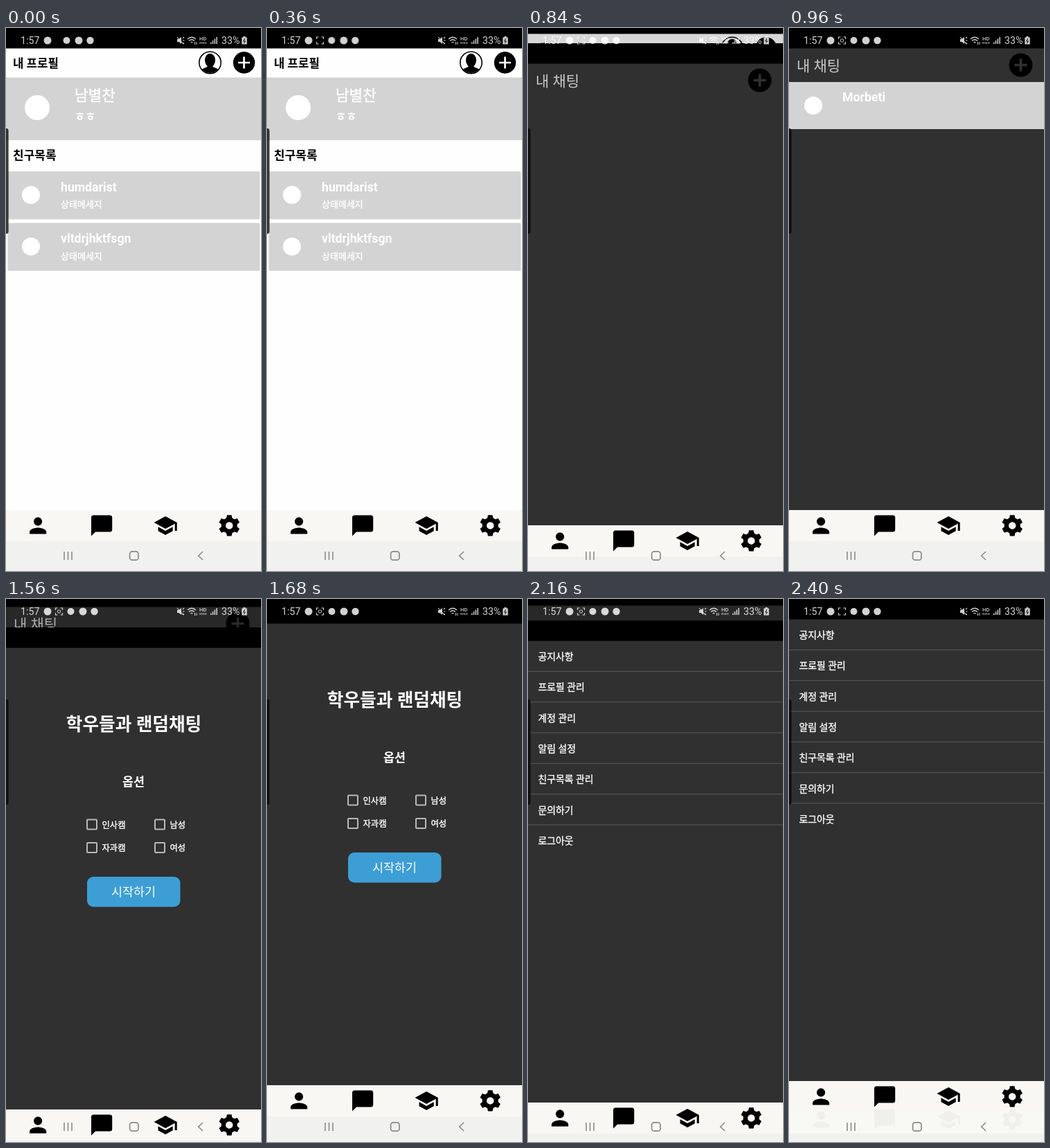
Recreate the animation shown at these times as an HTML page. Size 368x784 px, loop 2.64 s.

```html
<!DOCTYPE html>
<html lang="ko">
<head>
<meta charset="utf-8">
<title>Chat app</title>
<style>
  html, body { margin: 0; width: 100%; height: 100%; overflow: hidden; background: #000; }
  svg { display: block; width: 368px; height: 784px; }
  text { font-family: Roboto, "Noto Sans CJK KR", "Noto Sans CJK", sans-serif; white-space: pre; }
</style>
</head>
<body>
<svg id="stage" viewBox="0 0 368 784" xmlns="http://www.w3.org/2000/svg"></svg>
<script>
const LOOP = 2640;
const DARK = '#303030', CARD = '#d3d3d3';

const rect = (x, y, w, h, fill, more = '') =>
  `<rect x="${x}" y="${y}" width="${w}" height="${h}" fill="${fill}" ${more}/>`;
const disc = (x, y, r, fill, more = '') =>
  `<circle cx="${x}" cy="${y}" r="${r}" fill="${fill}" ${more}/>`;
const label = (x, y, size, str, fill = '#fff', weight = 400, more = '') =>
  `<text x="${x}" y="${y}" font-size="${size}" fill="${fill}" font-weight="${weight}" ${more}>${str}</text>`;
// Medium weight: regular glyphs with a hairline outline
const medium = (x, y, size, str) =>
  label(x, y, size, str, '#fff', 400, 'stroke="#fff" stroke-width=".35"');
const line = (d, color, width) =>
  `<path d="${d}" fill="none" stroke="${color}" stroke-width="${width}"/>`;
const group = (id, body, more = '') => `<g id="${id}" ${more}>${body}</g>`;

const plus = (x, y, r, arm, color, width) =>
  disc(x, y, r, '#000') + line(`M${x - arm} ${y}h${2 * arm}M${x} ${y - arm}v${2 * arm}`, color, width);

// Bottom tabs
const glyph = (x, d) => `<path transform="translate(${x - 18} 700.4) scale(1.51)" d="${d}"/>`;

function gear(x, y) {
  let teeth = '';
  for (let a = 0; a < 360; a += 60)
    teeth += `<path d="M-3.3 -15.1h6.6l1 5.1h-8.6z" transform="rotate(${a})"/>`;
  return `<g transform="translate(${x} ${y})">${teeth}` +
    disc(0, 0, 8.4, 'none', 'stroke="#000" stroke-width="6.3"') + '</g>';
}

const tabIcons =
  glyph(46, 'M12 12c2.21 0 4-1.79 4-4s-1.79-4-4-4-4 1.79-4 4 1.79 4 4 4zm0 2c-2.67 0-8 1.34-8 4v2h16v-2c0-2.66-5.33-4-8-4z') +
  glyph(138, 'M20 2H4c-1.1 0-2 .9-2 2v18l4-4h14c1.1 0 2-.9 2-2V4c0-1.1-.9-2-2-2z') +
  glyph(230, 'M5 13.18v4L12 21l7-3.82v-4L12 17zM12 3L1 9l11 6 9-4.91V17h2V9z') +
  gear(322.2, 718.4);

const screen = (id, bg, body) => group(id,
  rect(0, 0, 368, 697, bg) + rect(0, 0, 368, 29.5, '#000', `id="${id}Bar"`) + body +
  rect(0, 696, 368, 45, '#f8f7f4') + rect(0, 741, 368, 90, '#f1f1ef') + tabIcons);

// Friends screen
const friend = (y, name) =>
  rect(2.2, y, 364.4, 69.5, '#e2e2e2', 'rx="2"') + rect(3, y + .3, 363, 68.3, CARD, 'rx="2"') +
  disc(36, y + 34, 13, '#fff') +
  label(79, y + 28.5, 17.7, name, '#fff', 700) +
  medium(79, y + 52, 13, '상태메세지');

const avatar =
  '<clipPath id="face"><circle cx="294.5" cy="50" r="15"/></clipPath>' +
  disc(294.5, 50, 15.7, '#fff', 'stroke="#000" stroke-width="1.6"') +
  '<g clip-path="url(#face)"><ellipse cx="294.5" cy="46.5" rx="7.5" ry="9.8"/>' +
  '<path d="M290.5 52h8v4l9 4v8h-26v-8l9-4z"/></g>';

const friends = screen('friends', '#fefefe',
  label(10, 57, 16.8, '내 프로필', '#000', 700) + avatar + plus(343.5, 50, 15.7, 8.5, '#fff', 2.7) +
  rect(0, 71.5, 368, 90.5, CARD) + disc(45, 115, 18, '#fff') +
  medium(99, 104.5, 21.3, '남별찬') +
  label(99, 134, 16.5, 'ㅎㅎ', '#fff', 700) +
  label(10, 190, 17, '친구목록', '#000', 700) +
  friend(207, 'humdarist') + friend(281.5, 'vltdrjhktfsgn'));

// Chat list
const chats = screen('chats', DARK,
  label(11, 62, 21, '내 채팅', '#cbcbcb') + plus(334.5, 53.5, 17, 9, DARK, 3.6) +
  group('room', rect(0, 78, 368, 68, CARD) + disc(35, 112, 13, '#fff') +
    label(77, 106, 17.7, 'Morbeti', '#fff', 700)));

// Random chat
const option = (x, y, str) =>
  rect(x - 7, y - 7, 14, 14, 'none', 'rx="1" stroke="#b9b9b9" stroke-width="2"') +
  medium(x + 14.5, y + 5, 12.3, str);

const match = screen('match', DARK,
  label(184.5, 148.5, 25.7, '학우들과 랜덤채팅', '#fff', 700, 'text-anchor="middle"') +
  label(184, 229, 17.4, '옵션', '#fff', 700, 'text-anchor="middle"') +
  option(124, 284.5, '인사캠') + option(222, 284.5, '남성') +
  option(124, 318, '자과캠') + option(222, 318, '여성') +
  rect(117, 360, 134.5, 43.5, '#3d9ed6', 'rx="9"') +
  label(184, 388, 17.4, '시작하기', '#fff', 400, 'text-anchor="middle"'));

// Settings
const items = ['공지사항', '프로필 관리', '계정 관리', '알림 설정', '친구목록 관리', '문의하기', '로그아웃'];
const settings = screen('settings', DARK,
  items.map((str, i) => medium(14.5, 57 + i * 44.3, 13.9, str) +
    (i ? rect(0, 28.7 + i * 44.3, 368, 1, '#595959') : '')).join(''));

// Faint reflection of the tabs over the navigation bar
const trail = group('trail', rect(0, 741, 368, 30.5, '#f8f8f4') +
  `<g transform="translate(0 33)" opacity=".03">${tabIcons}</g>`);

// System bars
const corners = 'M71.5 16v-3h3M78.5 13h3v3M81.5 20v3h-3M74.5 23h-3v-3';
const status = group('status',
  label(21, 23, 14.2, '1:57') + disc(60, 18, 5.5, '#fff') +
  group('capture', line(corners, '#fff', 1.2) +
    group('lens', disc(76.5, 18, 2.2, 'none', 'stroke="#fff"'))) +
  group('slide', disc(93.5, 18, 5, '#fff') + disc(111, 18, 5.5, '#fff') + disc(127.5, 18, 5.2, '#fff')) +
  '<path fill="#fff" d="M247 16h2.5l3.5-3v10l-3.5-3H247z"/>' +
  line('M247 13l9 10M255 15l2-2M255 18h2.5M255 21l2 2', '#fff', 1.1) +
  line('M262 16q6-5.5 12 0M264 18.5q4-3.5 8 0M266.5 21q1.5-1.2 3 0', '#fff', 1.3) +
  line('M272.5 24v-4M275 20v4', '#fff', 1) +
  label(279, 17.5, 7.6, 'HD', '#fff', 500) + label(278.5, 22.5, 4, 'VOICE', '#fff', 500) +
  [0, 1, 2, 3].map(i => rect(295 + i * 2.8, 20.5 - i * 2.5, 1.5, 2.5 + i * 2.5, '#fff')).join('') +
  label(311, 23, 14.2, '33%') +
  '<path fill="#fff" d="M342.5 12h3v1.5h2.2v10h-7.4v-10h2.2z"/>' +
  line('M344.7 15l-2 4h2.6l-2 3', '#222', 1.1), 'opacity=".82"');

const nav =
  line('M84 756v12M89.5 756v12M95 756v12', '#8a8a88', 1.6) +
  rect(178.6, 755.8, 12.4, 12.4, 'none', 'rx="3.4" stroke="#8a8a88" stroke-width="1.7"') +
  line('M284 756l-6.3 6 6.3 6', '#8a8a88', 1.6);

const handle = '<path d="M0 145h1q2.6 0 2.6 4v144q0 4-2.6 4h-1z" fill="#08080c" opacity=".8"/>';

document.getElementById('stage').innerHTML =
  rect(0, 0, 368, 784, '#000') +
  friends + chats + match + settings + trail + status + nav + handle;

// Each row holds its value until the next: [ms, opacity, x, y]
function hold(id, rows) {
  const frames = rows.map(([ms, opacity, x = 0, y = 0]) => ({
    offset: ms / LOOP, opacity, transform: `translate(${x}px, ${y}px)`, easing: 'steps(1, end)'
  }));
  frames.push({ ...frames[frames.length - 1], offset: 1 });
  document.getElementById(id).animate(frames, { duration: LOOP, iterations: Infinity });
}

const moves = {
  friends: [[0, 1], [840, .85, 0, -21], [960, 0]],
  chats: [[0, 0], [720, .08, 0, 183.5], [840, 1, 0, 22], [960, 1], [1560, .85, 0, -18], [1680, 0]],
  chatsBar: [[0, 0], [840, 1]],
  room: [[0, 0], [960, 1]],
  match: [[0, 0], [1560, 1, 0, 41], [1680, 1, 0, 6], [1800, 1, 0, 1], [1920, 1], [2160, .85, 0, -20], [2280, 0]],
  settings: [[0, 0], [2040, .08, 0, 183.5], [2160, 1, 0, 31], [2280, 1, 0, 4], [2400, 1]],
  settingsBar: [[0, 0], [2160, 1]],
  trail: [[0, 0], [2400, 1]],
  capture: [[0, 0], [120, .4], [240, .8], [360, 1]],
  lens: [[0, 0], [960, 1], [2400, 0]],
  slide: [[0, 1, -6], [120, 1, -2.5], [240, 1, -1], [360, 1, -.3], [480, 1]]
};
for (const id in moves) hold(id, moves[id]);
</script>
</body>
</html>
```
